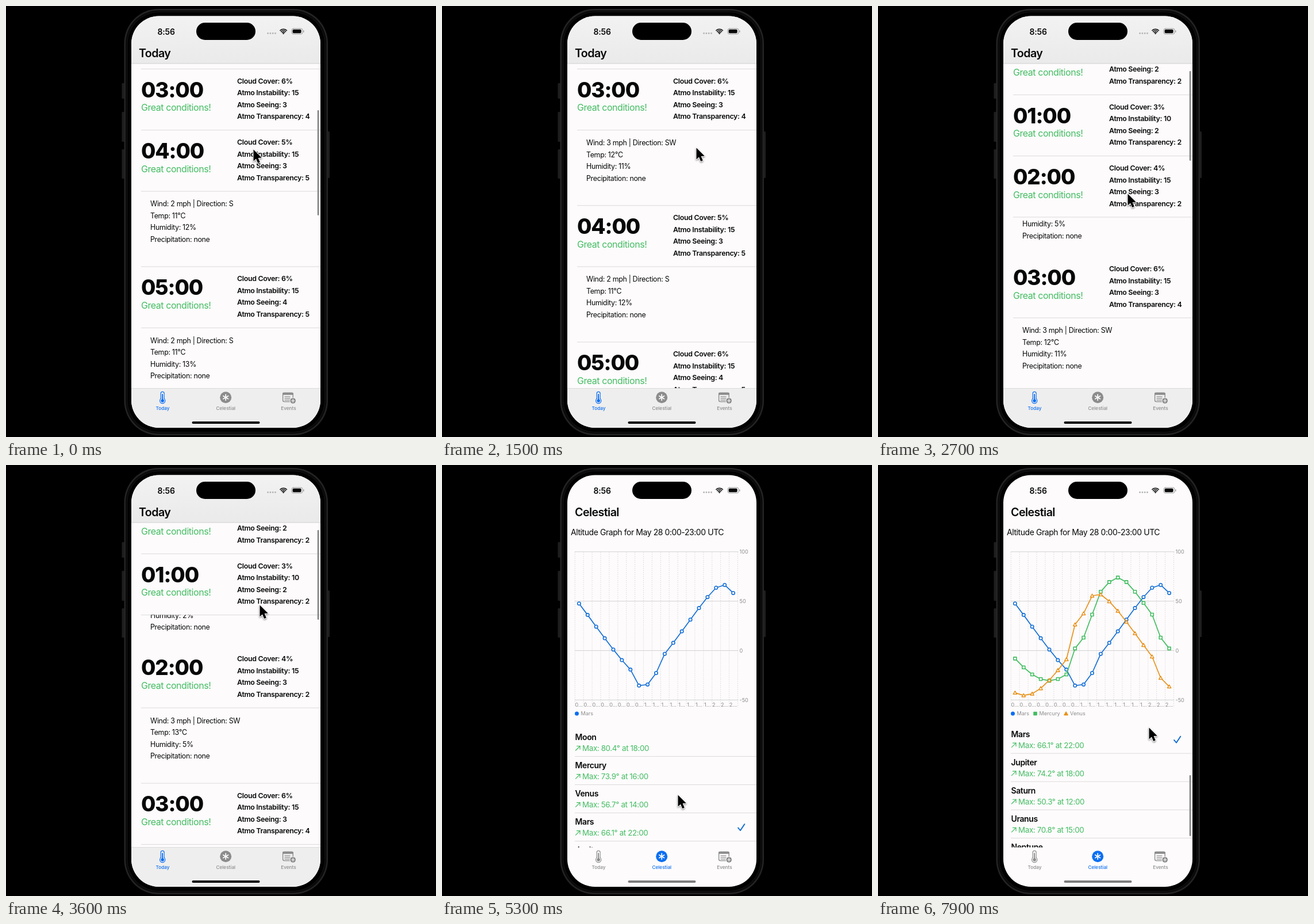
These frames come from a looping animation (748 by 749 pixels, 8000 ms). An HTML page with a canvas:

```html
<!DOCTYPE html>
<html lang="en">
<head>
<meta charset="utf-8">
<title>Sky conditions</title>
<style>
  html, body { margin: 0; width: 100%; height: 100%; overflow: hidden; background: #000; }
  canvas { display: block; }
</style>
</head>
<body>
<canvas id="stage" width="748" height="749"></canvas>
<script>
const ctx = document.getElementById('stage').getContext('2d');
const LOOP = 8000, CELESTIAL_AT = 4300, TRAVEL = 560;
const PAPER = '#fdfbfc', INK = '#080808', GREY = '#8c8c8c', RULE = '#dcdadb', BAR = '#efeeee';
const BLUE = '#1670d6', GREEN = '#43bd62', ORANGE = '#e8921c', TINT = '#0b6ff2';

// Text styles: weight, size, letter spacing
const STYLE = {
  clock: [600, 14, -0.2], title: [600, 19.7, -0.6], hour: [800, 36.8, -1.1],
  verdict: [400, 16, -0.45], fact: [600, 12.4, -0.32], detail: [400, 12.4, -0.32],
  caption: [400, 14, -0.43], name: [600, 14, -0.4], max: [400, 13.4, -0.37],
  axis: [400, 9.1, 0], tab: [500, 8.2, 0]
};

const ROW = 106.3, DETAIL = 131, LINE = 20.5;
const OPENED = { 1: 3440, 2: 2515, 3: 750, 4: -1000, 5: -1000 };

const BODIES = [
  'Moon 80.4 18', 'Mercury 73.9 16', 'Venus 56.7 14', 'Mars 66.1 22',
  'Jupiter 74.2 18', 'Saturn 50.3 12', 'Uranus 70.8 15', 'Neptune 48.6 13'
].map(s => s.split(' '));

// peak: hour of the highest altitude; dec: declination in degrees
const SERIES = [
  { name: 'Mars', from: 4900, peak: 21.2, dec: 16.7 },
  { name: 'Mercury', from: 7000, peak: 16, dec: 21.7 },
  { name: 'Venus', from: 5600, peak: 13.12, dec: 6.8 }
];
const LINES = [BLUE, GREEN, ORANGE];
const LATITUDE = 37.8, MISSING = [7, 8, 11, 13, 21];
const SAMPLES = [...Array(24).keys()].filter(h => !MISSING.includes(h));

// Pointer stops: arrival time, x, y
const STOPS = [
  [0, 430, 249], [660, 440, 180], [1400, 442, 246], [2400, 434, 326], [3300, 441, 243],
  [4200, 383, 682], [4800, 412, 630], [5290, 410, 573], [6600, 493, 533], [7500, 471, 456]
];

const mix = (a, b, p) => a + (b - a) * p;
const rad = deg => deg * Math.PI / 180;
function ease(t, from, to) {
  const p = Math.min(1, Math.max(0, (t - from) / (to - from)));
  return p * p * (3 - 2 * p);
}
function altitude({ peak, dec }, hour) {
  const lat = rad(LATITUDE), d = rad(dec), angle = rad((hour - peak) * 15);
  return Math.asin(Math.sin(lat) * Math.sin(d) + Math.cos(lat) * Math.cos(d) * Math.cos(angle)) * 180 / Math.PI;
}

// y is the middle of the capitals
function text(str, x, y, style, color = INK, align = 'left') {
  const [weight, size, gap] = STYLE[style];
  ctx.font = `${weight} ${size}px Inter, "Liberation Sans", sans-serif`;
  ctx.letterSpacing = gap + 'px';
  ctx.textAlign = align;
  ctx.fillStyle = color;
  ctx.fillText(str, x, y + size * 0.36);
  return ctx.measureText(str).width;
}
function paint(fill, stroke, lw) {
  if (fill) { ctx.fillStyle = fill; ctx.fill(); }
  if (stroke) { ctx.strokeStyle = stroke; ctx.lineWidth = lw; ctx.stroke(); }
}
function box(x, y, w, h, r, fill, stroke, lw = 1) {
  ctx.beginPath();
  ctx.roundRect(x, y, w, h, r);
  paint(fill, stroke, lw);
}
function disc(x, y, r, fill, stroke, lw = 1) {
  ctx.beginPath();
  ctx.arc(x, y, r, 0, Math.PI * 2);
  paint(fill, stroke, lw);
}
function poly(points, fill, stroke, lw = 1, close = false) {
  ctx.beginPath();
  points.forEach(([x, y]) => ctx.lineTo(x, y));
  if (close) ctx.closePath();
  paint(fill, stroke, lw);
}
function rule(x, y, color = RULE) {
  ctx.fillStyle = color;
  ctx.fillRect(x, y - 0.5, 547 - x, 1);
}
function lines(list, x, y, style) {
  list.forEach((s, i) => text(s, x, y + i * LINE, style));
}
function clipped(y, h, draw, r = 0) {
  ctx.save();
  ctx.beginPath();
  ctx.roundRect(218, y, 329, h, r);
  ctx.clip();
  draw();
  ctx.restore();
}
function scrollbar(y, h, alpha) {
  ctx.globalAlpha = alpha;
  box(541.7, y, 2.8, h, 1.4, '#898889');
  ctx.globalAlpha = 1;
}

function drawPhone() {
  for (const [x, y, h] of [[201.5, 134, 27], [201.5, 184, 52], [201.5, 249, 51], [558, 218, 81]])
    box(x, y, 5, h, 1.5, '#1e1e1e');
  box(205.5, 5, 354.5, 741, 60, '#242424');
  box(208, 7.5, 349.5, 736, 57.5, '#0a0a0a');
  box(211, 10.5, 343.5, 730, 55, '#000', '#141414');
  box(218, 17.5, 329, 715.5, 48, PAPER);
}

function drawHour(i, top) {
  text(`0${i}:00`, 235, top + 36, 'hour');
  text('Great conditions!', 235, top + 67.3, 'verdict', GREEN);
  lines([
    `Cloud Cover: ${'334656'[i]}%`,
    `Atmo Instability: ${i < 2 ? 10 : 15}`,
    `Atmo Seeing: ${i < 2 ? 2 : i < 5 ? 3 : 4}`,
    `Atmo Transparency: ${i < 3 ? 2 : Math.min(i + 1, 5)}`
  ], 402, top + 21, 'fact');
}

function drawDetail(i, top, height) {
  const humidity = i < 3 ? 3 * i - 1 : 8 + i;
  clipped(Math.max(100, top), height, () => lines([
    `Wind: ${i < 4 ? 3 : 2} mph | Direction: ${i < 4 ? 'SW' : 'S'}`,
    `Temp: ${Math.max(11, 15 - i)}°C`,
    `Humidity: ${humidity}%`,
    'Precipitation: none'
  ], 251, top + 22 - (DETAIL - height) * 0.82, 'detail'));
}

function drawToday(t) {
  const scroll = ease(t, 1700, 2400);
  let top = mix(-209.5, 48, scroll);
  clipped(100, 564.5, () => {
    for (let i = 0; i < 6; i++) {
      drawHour(i, top);
      top += ROW;
      rule(235, top);
      const at = OPENED[i] ?? Infinity, open = ease(t, at, at + 360);
      if (!open) continue;
      drawDetail(i, top, DETAIL * open);
      top += DETAIL * open;
      if (open === 1) rule(235, top);
    }
  });
  if (t < 1600) scrollbar(181, 183, 1 - ease(t, 500, 800));
  else scrollbar(mix(172, 113, scroll), 156, ease(t, 1680, 1780));

  // translucent bars
  clipped(17.5, 715.5, () => {
    const g = ctx.createLinearGradient(0, 17, 0, 100);
    g.addColorStop(0, '#f3f2f2');
    g.addColorStop(1, '#ebeaea');
    ctx.fillStyle = g;
    ctx.fillRect(218, 17, 329, 83);
    ctx.fillStyle = BAR;
    ctx.fillRect(218, 664.5, 329, 69);
    rule(218, 100, '#d2d1d2');
    rule(218, 664.5, '#dddcdc');
  }, 48);
}

function marker(kind, x, y, r, fill, stroke) {
  if (kind === 0) disc(x, y, r, fill, stroke, 1.6);
  else if (kind === 1) box(x - r + 0.2, y - r + 0.2, 2 * r - 0.4, 2 * r - 0.4, 0, fill, stroke, 1.6);
  else poly([[x, y - r - 0.3], [x + r + 0.4, y + r - 0.2], [x - r - 0.4, y + r - 0.2]], fill, stroke, 1.5, true);
}

function drawChart(active) {
  const step = 14.9, toY = v => 322.5 - v * 1.717;
  ctx.setLineDash([1.5, 2]);
  ctx.lineCap = 'butt';
  for (let i = 0; i < 20; i++) poly([[231.3 + i * step, 151], [231.3 + i * step, 421]], null, '#d9d8d9');
  ctx.setLineDash([]);
  ctx.lineCap = 'round';
  for (let v = 100; v >= -50; v -= 50) {
    poly([[231, toY(v)], [515, toY(v)]], null, '#d3d2d3');
    text(v, 517.5, toY(v), 'axis', GREY);
  }
  SAMPLES.forEach((h, i) => text(Math.floor(h / 10) + '...', 238.3 + i * step, 417, 'axis', GREY, 'center'));

  let x = 234.5;
  active.forEach((s, k) => {
    const pts = SAMPLES.map((h, i) => [238.4 + i * step, toY(altitude(s, h))]);
    poly(pts, null, LINES[k], 1.7);
    pts.forEach(([px, py]) => marker(k, px, py, 2.7, '#fff', LINES[k]));
    marker(k, x, 432, 2.7, k ? LINES[k] : TINT, k ? LINES[k] : TINT);
    x += 17.5 + text(s.name, x + 7, 432, 'axis', GREY);
  });
}

function drawCelestial(t) {
  const active = SERIES.filter(s => t >= s.from);
  text('Altitude Graph for May 28 0:00-23:00 UTC', 224, 117, 'caption');
  if (active.length) drawChart(active);
  const scroll = ease(t, 7350, 7880);
  clipped(456, 208.5, () => BODIES.forEach(([name, max, hour], i) => {
    const y = 473 + i * 49.05 - 152.5 * scroll;
    text(name, 231.5, y, 'name');
    poly([[232.5, y + 23], [240, y + 15.5]], null, GREEN, 1.2);
    poly([[234.5, y + 15.5], [240, y + 15.5], [240, y + 21]], null, GREEN, 1.2);
    text(`Max: ${max}° at ${hour}:00`, 244, y + 19.5, 'max', GREEN);
    rule(231, y + 33.5);
    if (active.some(s => s.name === name))
      poly([[515, y + 10.3], [519, y + 15], [526.3, y + 4]], null, BLUE, 1.9);
  }));
  scrollbar(mix(461, 539, scroll), 106, ease(t, 7350, 7450));
}

function drawStatus(title) {
  box(331, 29, 103, 30, 15, '#000');
  text('8:56', 263.5, 44.5, 'clock');
  for (let i = 0; i < 4; i++) disc(455.6 + i * 4.3, 47.5, 1.4, '#b4b3b4');
  for (let r = 3.2; r < 9; r += 2.6) {
    ctx.beginPath();
    ctx.arc(482.6, 48.6, r, -Math.PI * 0.74, -Math.PI * 0.26);
    paint(null, INK, 1.6);
  }
  disc(482.6, 47.8, 1.2, INK);
  box(497, 39.2, 19, 9.6, 3, null, '#999');
  box(498.6, 40.8, 15, 6.4, 1.8, INK);
  box(517.2, 42.3, 1.3, 3.5, 0.6, '#999');
  text(title, 231, 82, 'title');
}

function drawTabs(celestial) {
  const bg = celestial ? PAPER : BAR;
  const [a, b] = celestial ? [GREY, TINT] : [TINT, GREY];
  // thermometer
  box(269.2, 670.4, 6, 16, 3, bg, a, 1.2);
  disc(272.2, 686, 4.6, bg, a, 1.2);
  box(270, 672, 4.4, 13, 2.2, bg);
  box(271.2, 674, 2, 12, 1, a);
  disc(272.2, 686, 2.8, a);
  // asterisk
  disc(382.2, 680.2, 10, b);
  for (let i = 0; i < 3; i++) {
    const c = Math.cos(rad(90 + i * 60)) * 5, s = Math.sin(rad(90 + i * 60)) * 5;
    poly([[382.2 - c, 680.2 - s], [382.2 + c, 680.2 + s]], null, '#fff', 1.7);
  }
  // list with plus
  box(481.6, 672.4, 17.6, 15.2, 2.5, null, GREY, 1.4);
  box(481, 671.8, 18.8, 4, 1.5, GREY);
  for (let y = 679; y < 686; y += 3) box(484.5, y - 0.6, 10, 1.2, 0, GREY);
  disc(499.2, 686, 5.8, bg);
  disc(499.2, 686, 4.8, GREY);
  poly([[496.6, 686], [501.8, 686]], null, '#fff', 1.1);
  poly([[499.2, 683.4], [499.2, 688.6]], null, '#fff', 1.1);

  text('Today', 272.5, 699, 'tab', a, 'center');
  text('Celestial', 382.3, 699, 'tab', b, 'center');
  text('Events', 491.5, 699, 'tab', GREY, 'center');
  box(323.5, 722, 118, 4, 2, celestial ? '#7d7c7d' : '#050505');
}

function drawPointer(t) {
  let [, x, y] = STOPS[0];
  for (const [at, nx, ny] of STOPS) {
    const p = ease(t, at - TRAVEL, at);
    x = mix(x, nx, p);
    y = mix(y, ny, p);
  }
  ctx.save();
  ctx.translate(x, y);
  ctx.shadowColor = 'rgba(0,0,0,.35)';
  ctx.shadowBlur = 3;
  ctx.shadowOffsetY = 1.5;
  const arrow = [[0.5, 0.5], [0.5, 20.5], [5, 16.4], [8.2, 24], [11.8, 22.5], [8.6, 15], [14.8, 14.8]];
  poly(arrow, '#fff', '#fff', 2, true);
  ctx.shadowColor = 'transparent';
  poly(arrow, '#000', null, 1, true);
  ctx.restore();
}

function frame(now) {
  const t = now % LOOP, celestial = t >= CELESTIAL_AT;
  ctx.fillStyle = '#000';
  ctx.fillRect(0, 0, 748, 749);
  drawPhone();
  if (celestial) drawCelestial(t); else drawToday(t);
  drawStatus(celestial ? 'Celestial' : 'Today');
  drawTabs(celestial);
  drawPointer(t);
  requestAnimationFrame(frame);
}
ctx.lineJoin = ctx.lineCap = 'round';
requestAnimationFrame(frame);
</script>
</body>
</html>
```
